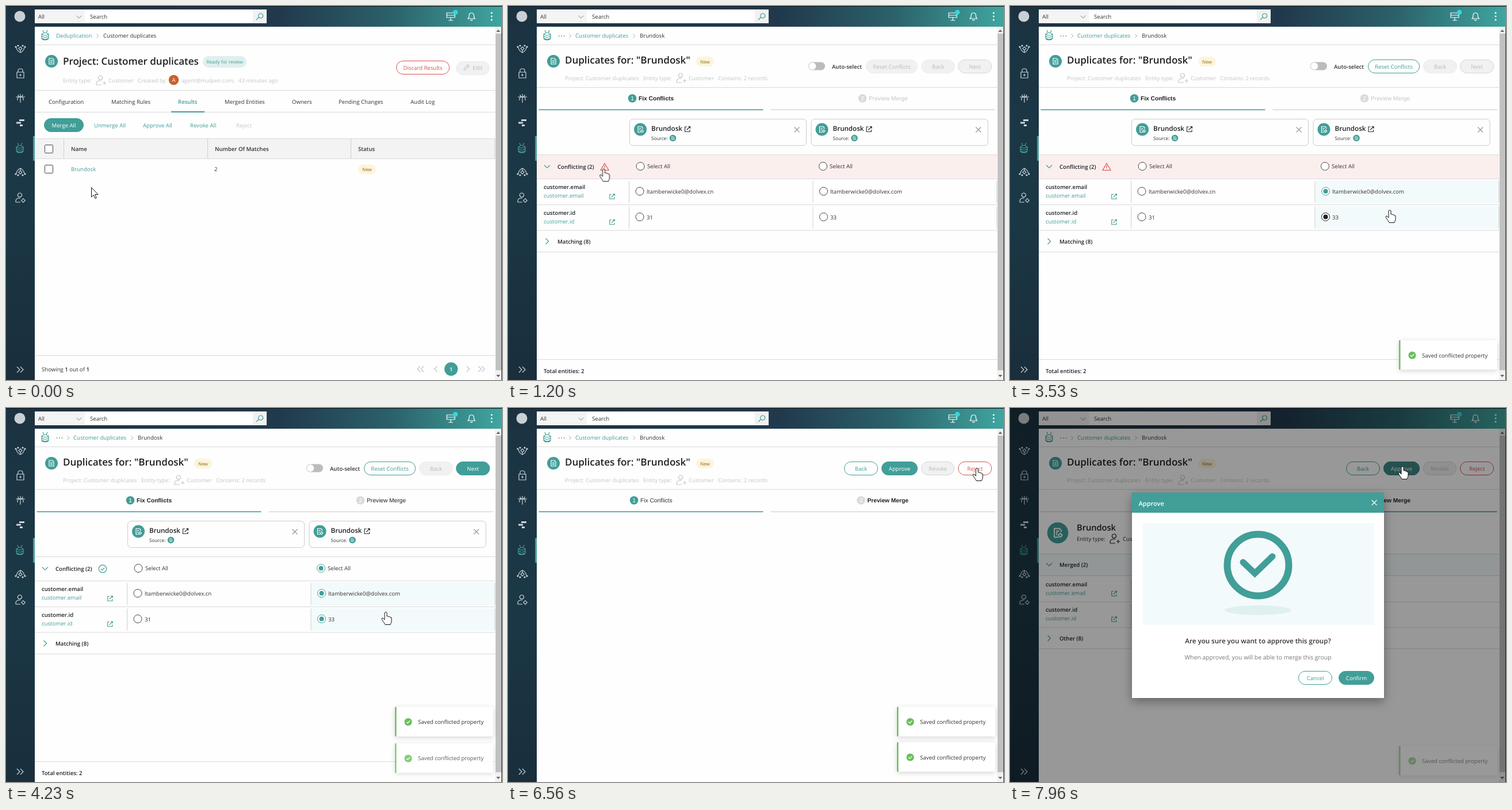
These frames come from a looping animation (862x650 px, 8 s). An HTML page:

```html
<!DOCTYPE html>
<html lang="en">
<head>
<meta charset="utf-8">
<title>Customer duplicates</title>
<style>
  html, body { margin: 0; width: 100%; height: 100%; overflow: hidden; background: #fefefe; }
  svg { display: block; width: 100%; height: 100%; color: #333; font: 9.6px "Open Sans", "Noto Sans", sans-serif; text-rendering: geometricPrecision; }
  text { fill: currentColor; white-space: pre; }
  .icon { fill: none; stroke: currentColor; stroke-width: 1.2; }
  .teal { color: #419e98; }
  .red { color: #d9534f; }
  .white { color: #fff; }
  .gray { color: #c3c5c7; }
  .dim { color: #999; }
  .black { color: #1f2023; }
  .pale { color: #ccd5da; }
  .gold { color: #8a6a2a; }
  .b { font-weight: 600; }
  .s { font-size: 8.2px; }
  .m { font-size: 11.6px; }
  .n { font-size: 14.6px; }
  .t { font-size: 17px; }
  .mid { text-anchor: middle; }
  .step { font: 10.2px "Liberation Sans", Arial, sans-serif; }
  .step.b { font-weight: 700; }
  .solid { color: #fff; }
  .solid rect { fill: #419e98; stroke: #419e98; }
  .outline rect { fill: #fefefe; stroke: currentColor; }
  .off { color: #b9babb; }
  .off rect { fill: #f1f1f1; stroke: #ededed; }
  .off.rim rect { stroke: #d6d6d6; }
  .pressed rect { fill: #3d8782; stroke: #3d8782; }

  [class^=at] { animation: 8s step-end infinite; }
  .at800 { animation-name: at800; }
  .at2900 { animation-name: at2900; }
  .at3170 { animation-name: at3170; }
  .at3500 { animation-name: at3500; }
  .at4000 { animation-name: at4000; }
  .at6460 { animation-name: at6460; }
  .at6680 { animation-name: at6680; }
  .at7660 { animation-name: at7660; }
  @keyframes at800 { from { visibility: hidden } 10%, to { visibility: visible } }
  @keyframes at2900 { from { visibility: hidden } 36.25%, to { visibility: visible } }
  @keyframes at3170 { from { visibility: hidden } 39.625%, to { visibility: visible } }
  @keyframes at3500 { from { visibility: hidden } 43.75%, to { visibility: visible } }
  @keyframes at4000 { from { visibility: hidden } 50%, to { visibility: visible } }
  @keyframes at6460 { from { visibility: hidden } 80.75%, to { visibility: visible } }
  @keyframes at6680 { from { visibility: hidden } 83.5%, to { visibility: visible } }
  @keyframes at7660 { from { visibility: hidden } 95.75%, to { visibility: visible } }

  .toast1 { animation: toast1 8s ease-out infinite; }
  .toast2 { animation: toast2 8s linear infinite; }
  @keyframes toast1 {
    0%, 39.6% { opacity: 0; transform: translateY(10px) }
    42.8%, 50% { opacity: 1; transform: none }
    51.5%, 87.5% { opacity: 1; transform: translateY(-61.5px) }
    90.6%, 100% { opacity: 0; transform: translateY(-51.5px) }
  }
  @keyframes toast2 {
    0%, 50.4% { opacity: 0; transform: translateY(10px) }
    53.5%, 97.8% { opacity: 1; transform: none }
    100% { opacity: .45; transform: translateY(8px) }
  }
  .dialog { animation: dialog 8s linear infinite; }
  @keyframes dialog { 0%, 98% { opacity: 0 } 99.4%, 100% { opacity: 1 } }

  .cursor { animation: travel 8s cubic-bezier(.65, 0, .35, 1) infinite; }
  @keyframes travel {
    0%, .75% { transform: translate(148px, 315px) }
    7.5%, 12.9% { transform: translate(148px, 281px) }
    24.1%, 37.2% { transform: translate(655px, 317px) }
    43.7%, 66.25% { transform: translate(660px, 354px) }
    77.9%, 82% { transform: translate(815px, 104px) }
    92.9%, 100% { transform: translate(682px, 101px) }
  }
  .cursor path { fill: #fff; stroke: #111; }
  .arrow { animation: arrow 8s step-end infinite; }
  .hand { animation: hand 8s step-end infinite; }
  @keyframes arrow { 0% { visibility: visible } 6% { visibility: hidden } 64% { visibility: visible } 76.6%, to { visibility: hidden } }
  @keyframes hand { 0% { visibility: hidden } 6% { visibility: visible } 64% { visibility: hidden } 76.6%, to { visibility: visible } }
</style>
</head>
<body>
<svg id="stage" viewBox="0 0 862 650"></svg>
<script>
const TEAL = '#419e98', PAGE = '#fefefe', EDGE = '#dadada', TINT = '#f3fafb';
const NAME = 'Brundosk', MAIL = 'ltamberwicke0@dolvex.';

const shapes = {
  right: 'M-2.5-5L2.5 0L-2.5 5',
  left: 'M2.5-5L-2.5 0L2.5 5',
  down: 'M-5-2.5L0 2.5L5-2.5',
  rights: 'M-5-5L0 0L-5 5M1-5L6 0L1 5',
  lefts: 'M5-5L0 0L5 5M-1-5L-6 0L-1 5',
  close: 'M-4.5-4.5L4.5 4.5M4.5-4.5L-4.5 4.5',
  open: 'M-1-4H-4.5V4.5H4V1M1-4.5H4.5V-1M4.5-4.5L-1.5 1.5',
  glass: 'M-1.5 1.5L-6 6M-1 2A4 4 0 1 1 2 3A4 4 0 0 1-1 2',
  db: 'M-4-9L-2-4.5M4-9L2-4.5M-6-2Q0-7 6-2V5Q5 8 0 8T-6 5ZM-6-2Q0 2 6-2M-6 1.5Q0 5.5 6 1.5M-6 5Q0 8.5 6 5',
  user: 'M-1-8A3.6 3.6 0 1 1-1.1-8ZM-8 8V6Q-8 1-2 1H1M-8 8H1M3 5H9M6 2V8',
  doc: 'M-4-5H1.5L4-2.5V5H-4ZM-2-1.5H2M-2 .5H2M-2 2.5H2',
  record: 'M1 5H-4V-5H2L4-3V-1M-2-2H1.5M-2 0H0M-2 2H-.5M3 1A1.8 1.8 0 1 1 2.9 1ZM3 0V1M3 4.6V5.6M.2 2.8H1.2M4.8 2.8H5.8',
  lock: 'M-6-2H6V8H-6ZM-4-2V-5Q-4-8 0-8T4-5V-2M0 1V5M-2 3H2',
  split: 'M0-7V8M-8-2H8M-4-6Q-4-2 0-2T4-6M-5 4V1Q-5-2 0-2T5 1V4',
  bars: 'M-2-3.5H7M-7 1H1M-1 5.5H4',
  admin: 'M-1-8A3.6 3.6 0 1 1-1.1-8ZM-8 8V6Q-8 1-2 1H0M-8 8H0M5 2.5A2.5 2.5 0 1 1 4.9 2.5ZM5 1V2M5 8V9M1 5H2M8 5H9',
  net: 'M0-3L3 0L0 3L-3 0ZM-7-2Q-6 4 0 7Q6 4 7-2M0 3V7',
  server: 'M-7-6H7V-2H-7ZM-7-2V2H7V-2M0 2V7M-4 7H4',
  bell: 'M-6 4Q-4 2-4-2Q-4-6 0-6T4-2Q4 2 6 4ZM-2 6Q0 8 2 6',
  pencil: 'M-5 5L-4 1L3-6L6-3L-1 4ZM1-4L4-1',
  warn: 'M0-6L7 6H-7ZM0-2V2M0 3.5V4.7',
  tick: 'M-3 0L-1 2.3L3.2-2'
};

const text = (x, y, s, cls = '') => `<text x="${x}" y="${y}" class="${cls}">${s}</text>`;
const rect = (x, y, w, h, fill, more = '') => `<rect x="${x}" y="${y}" width="${w}" height="${h}" fill="${fill}" ${more}/>`;
const disc = (x, y, r, fill, more = '') => `<circle cx="${x}" cy="${y}" r="${r}" fill="${fill}" ${more}/>`;
const icon = (id, x, y, cls = '', k = 1) => `<path class="icon ${cls}" transform="translate(${x} ${y}) scale(${k})" d="${shapes[id]}"/>`;
const group = (cls, ...parts) => `<g class="${cls}">${parts.join('')}</g>`;
const rule = (y, x = 50, w = 800, fill = EDGE) => rect(x, y, w, 1, fill);
const post = (x, y, h) => rect(x, y, 1, h, '#cfcfcf');
const pill = (x, y, w, label, cls) => group(cls,
  rect(x + .5, y + .5, w - 1, 23, '', 'rx="11.5"'), text(x + w / 2, y + 15.5, label, 'mid'));
const tag = (x, y, w, label, fill, cls) =>
  rect(x, y, w, 17, fill, 'rx="8.5"') + text(x + w / 2, y + 11.7, label, 's mid ' + cls);
const badge = (x, y, r, id, k) => disc(x, y, r, TEAL) + icon(id, x, y, 'white', k);
const radio = (x, y, color) => disc(x, y, 7, '#fff', `stroke="${color || '#444'}"`) + (color ? disc(x, y, 4, color) : '');

function step(x, n, label, color, cls) {
  return disc(x, 160.5, 7.3, color) + text(x, 164, n, 'step white mid') + text(x + 11, 164, label, 'step ' + cls);
}

function steps(second, firstCls, secondCls, x1, x2) {
  const [c1, c2] = second ? [EDGE, TEAL] : [TEAL, EDGE];
  return rect(50, 142, 800, 48, PAGE) + step(x1, 1, 'Fix Conflicts', c1, firstCls) + step(x2, 2, 'Preview Merge', c2, secondCls) +
    rect(53.5, 179.5, 390, 1.6, c1) + rect(456.5, 179.5, 390, 1.6, c2);
}

function sidebar() {
  const dots = (y, s) => [[-8, -3], [8, -3], [-4, -5], [4, -5]].map(([x, d]) => disc(25 + x, y + d * s, 1.6, '#ccd5da')).join('');
  return rect(0, 0, 50, 650, 'url(#side)') + rect(47, 226, 3, 43, TEAL) +
    group('pale', icon('net', 25, 74), dots(74, 1), icon('lock', 25, 117), icon('split', 25, 160),
      `<g stroke-width="3">${icon('bars', 25, 202).replace('class', 'style="stroke-width:3" class')}</g>`,
      `<g transform="rotate(180 25 289)">${icon('net', 25, 289)}</g>`, dots(289, -1),
      icon('admin', 25, 333), icon('rights', 24, 632)) +
    icon('db', 24, 247, 'teal');
}

function topbar() {
  return rect(0, 0, 862, 36, 'url(#top)') + rect(0, 0, 862, 1, '#0b1116') + disc(24, 18, 9.5, '#c9d0d5') +
    rect(50, 6, 87, 24, '#f4f4f4') + rect(137, 6, 292, 24, '#fff') + rect(429, 6, 24, 24, '#f1f1f1') +
    text(56, 21.5, 'All') + icon('down', 127, 19, 'dim', .85) + text(146, 22, 'Search') + icon('glass', 441, 18, 'teal') +
    group('white', icon('server', 773, 18), icon('bell', 809, 18)) + disc(781, 11, 4.3, '#38d5dc') +
    [12, 18, 24].map(y => disc(844, y, 1.5, '#fff')).join('');
}

function scrollbar() {
  return rect(850, 36, 12, 614, '#f1f1f1') + rect(851, 48, 10, 585, '#c1c1c1') +
    '<path d="M852 45h7l-3.5-4zM852 641h7l-3.5 4z" fill="#666"/>' + rect(861, 36, 1, 614, '#2d3135');
}

function listPage() {
  const tabs = { Configuration: 74, 'Matching Rules': 183, 'Merged Entities': 380, Owners: 497, 'Pending Changes': 578, 'Audit Log': 703 };
  const actions = { 'Unmerge All': 153, 'Approve All': 238, 'Revoke All': 320 };
  const box = y => rect(67.5, y + .5, 14, 14, '#fff', 'stroke="#444" rx="1"');
  const labels = (set, y, cls) => Object.entries(set).map(([s, x]) => text(x, y, s, cls)).join('');
  return text(87, 55, 'Deduplication', 'teal') + icon('right', 159, 52, 'dim', .7) + text(169, 55, 'Customer duplicates') +
    badge(79, 96, 11, 'doc') + text(99, 102, 'Project: Customer duplicates', 't b black') +
    rect(342, 87, 76, 20, '#dfefee', 'rx="10"') + text(380, 100, 'Ready for review', 's mid teal') +
    group('gray', text(99, 133, 'Entity type:'), icon('user', 165, 129), text(178, 133, 'Customer'), text(229, 133, 'Created by:'),
      text(305, 133, 'agent@mulpen.com,'), text(404, 133, '43 minutes ago')) +
    disc(291.5, 128.5, 8.7, '#c8602c') + text(291.5, 132, 'A', 'mid white') +
    pill(678, 95, 93, 'Discard Results', 'outline red') + pill(782, 96, 59, '', 'off') +
    icon('pencil', 800, 107, 'gray', .85) + text(811, 111, 'Edit', 'off') +
    rule(146) + labels(tabs, 170, '') + text(299, 170, 'Results', 'teal b') + rule(184) + rect(287, 183, 58, 2, TEAL) +
    pill(66, 195, 69, 'Merge All', 'solid') + labels(actions, 211, 'teal') + text(400, 211, 'Reject', 'gray') +
    rect(50, 230, 800, 36, '#f3f3f4') + rule(230) + rule(265) + [100, 350, 599, 849].map(x => post(x, 231, 34)).join('') +
    box(241) + labels({ Name: 113, 'Number Of Matches': 363, Status: 612 }, 252, 'b') +
    box(276) + text(113, 287, NAME, 'teal') + text(362, 287, '2') + tag(612, 275.5, 31, 'New', '#fdf4da', 'gold') +
    rule(607) + text(62, 635, 'Showing <tspan class="b">1</tspan> out of <tspan class="b">1</tspan>') +
    group('gray', icon('lefts', 721, 631), icon('left', 747, 631), icon('right', 803, 631), icon('rights', 826, 631)) +
    disc(773.5, 631, 11.7, TEAL) + text(773.5, 634.5, '1', 'mid white b');
}

function duplicateHeader() {
  return rect(85, 38, 765, 29, PAGE) + rect(50, 68, 800, 582, PAGE) +
    [88.5, 93, 97.5].map(x => disc(x, 52, .9, '#888')).join('') + icon('right', 108, 52, 'dim', .7) +
    text(117, 55, 'Customer duplicates', 'teal') + icon('right', 219, 52, 'dim', .7) + text(229, 55, NAME) +
    badge(79, 96, 11, 'doc') + text(99, 100, `Duplicates for: "${NAME}"`, 't b black') + tag(327, 88, 31, 'New', '#fdf4da', 'gold') +
    group('gray', text(99, 129, 'Project: Customer duplicates'), text(235, 129, 'Entity type:'), icon('user', 301, 125),
      text(314, 129, 'Customer'), text(365, 129, 'Contains: 2 records')) + rule(141);
}

function card(x) {
  return rect(x + .5, 196.5, 307, 46, PAGE, 'stroke="#cbcbcb" rx="6"') + badge(x + 19, 214.5, 11, 'record') +
    text(x + 38, 217, NAME, 'm b black') + icon('open', x + 101, 214) + icon('close', x + 291, 215, 'dim') +
    text(x + 38, 233, 'Source:', 's') + badge(x + 75.5, 229.5, 5.8, 'record', .55);
}

function conflictRow(done) {
  return rect(50, 259, 800, 41, done ? PAGE : '#fbefee') + icon('down', 68, 279, 'teal') + text(86, 283, 'Conflicting (2)', 'b black') +
    (done ? disc(168, 279.5, 6.7, 'none', `stroke="${TEAL}" stroke-width="1.2"`) + icon('tick', 168, 279.5, 'teal') : icon('warn', 168, 279.5, 'red')) +
    radio(230, 278.5) + text(242, 282, 'Select All') + radio(547.5, 278.5, done && TEAL) + text(559, 282, 'Select All');
}

function property(y, key) {
  return text(62, y + 17, key, 'b black') + text(62, y + 32, key, 'teal') + icon('open', 181, y + 30, 'teal', .95) +
    post(210, y + 3, 38) + rule(y + 44);
}

function choices(y, a, b) {
  return radio(229, y + 21) + text(241, y + 25, a) + post(529.5, y + 3, 38) + post(849, y + 3, 38) + radio(548.5, y + 21) + text(560, y + 25, b);
}

const chosen = (y, value, color) => rect(531, y + 2.5, 318, 39, TINT) + radio(548.5, y + 21, color) + text(560, y + 25, value);

function conflictsPage() {
  return rect(522, 97.5, 29, 14, '#bcbcbc', 'rx="7"') + disc(529, 104.5, 6.2, '#fff') + text(563, 109, 'Auto-select', 'b') +
    pill(622, 93, 90, 'Reset Conflicts', 'off') + pill(718, 93, 59, 'Back', 'off') + pill(782, 93, 59, 'Next', 'off rim') +
    steps(false, 'b black', 'gray', 216, 616) + card(211) + card(526.5) + rule(258) + conflictRow(false) + rule(300) +
    property(301, 'customer.email') + choices(301, MAIL + 'cn', MAIL + 'com') +
    property(345.5, 'customer.id') + choices(345.5, '31', '33') +
    icon('right', 68, 409, 'teal') + text(86, 412.5, 'Matching (8)', 'b black') + rule(427) +
    rule(614) + text(62, 637.5, 'Total entities: 2', 'b black');
}

function mergedContent() {
  return steps(true, '', 'b black', 219, 613.5) + badge(83, 217, 18.3, 'record', 1.5) + text(116, 212.5, NAME, 'n b black') +
    text(116, 231, 'Entity type:') + icon('user', 182, 227, 'black') + text(196, 231, 'Customer') +
    text(246, 230.5, 'Source:', 's') + badge(284, 227.5, 5.8, 'record', .55) +
    rule(253) + rect(50, 254, 800, 37, TINT) + rule(291) + icon('down', 68, 272, 'teal') + text(86, 276, 'Merged (2)', 'b black') +
    property(292.5, 'customer.email') + text(222, 318, MAIL + 'com') + property(337, 'customer.id') + text(222, 362.5, '33') +
    icon('right', 68, 400, 'teal') + text(86, 404, 'Other (8)', 'b black') + rule(418);
}

const toast = cls => group(cls, rect(676, 581, 171, 51, '#fff', 'rx="2" filter="url(#soft)"'), rect(676, 581, 2.5, 51, '#6abf5b'),
  disc(699, 607, 6.6, '#6abf5b'), icon('tick', 699, 607, 'white'), text(716, 610.5, 'Saved conflicted property'));

function dialog() {
  return rect(0, 0, 862, 650, '#000', 'opacity=".4"') + rect(212, 147, 438, 357, '#fff', 'filter="url(#deep)"') +
    rect(212, 147, 438, 35, TEAL) + text(223.5, 169.5, 'Approve', 'b white" style="font-size:11px') + icon('close', 633, 164.5, 'white') +
    rect(230, 200, 403, 177, TINT) + disc(431, 273, 53.5, 'none', `stroke="${TEAL}" stroke-width="12"`) +
    `<path d="M405 268L425.500 287.500L456 258" fill="none" stroke="${TEAL}" stroke-width="11" stroke-linecap="round"/>` +
    '<ellipse cx="431" cy="351.500" rx="57.500" ry="8.500" fill="#e0f0f1"/>' +
    text(431, 408.5, 'Are you sure you want to approve this group?', 'm b mid') +
    text(431, 436.5, 'When approved, you will be able to merge this group', 'mid" style="font-size:10.4px;color:#777') +
    pill(501, 457, 59, 'Cancel', 'outline teal') + pill(571, 457, 62, 'Confirm', 'solid');
}

const defs = `<defs>
  <linearGradient id="top"><stop stop-color="#1c3240"/><stop offset=".55" stop-color="#21394d"/><stop offset=".78" stop-color="#2b626b"/><stop offset="1" stop-color="#3fa6a0"/></linearGradient>
  <linearGradient id="side" x2="0" y2="1"><stop stop-color="#1b3342"/><stop offset=".5" stop-color="#1b3846"/><stop offset="1" stop-color="#1a2e3c"/></linearGradient>
  <filter id="soft" x="-20%" y="-40%" width="140%" height="180%"><feDropShadow dx="0" dy="2" stdDeviation="4" flood-opacity=".17"/></filter>
  <filter id="deep" x="-20%" y="-20%" width="140%" height="140%"><feDropShadow dx="0" dy="6" stdDeviation="9" flood-opacity=".35"/></filter>
</defs>`;

document.getElementById('stage').innerHTML = [
  defs, rect(0, 0, 862, 650, PAGE), sidebar(), topbar(), icon('db', 68, 51, 'teal'), rule(67),
  group('at0', listPage()),
  group('at800', duplicateHeader(), conflictsPage()),
  group('at2900', chosen(301, MAIL + 'com', '#222')),
  group('at3170', chosen(301, MAIL + 'com', TEAL), pill(622, 93, 90, 'Reset Conflicts', 'outline teal')),
  group('at3500', chosen(345.5, '33', '#222')),
  group('at4000', conflictRow(true), chosen(345.5, '33', TEAL), pill(782, 93, 59, 'Next', 'solid'), steps(false, 'b black', 'black', 216, 616)),
  group('at6460', rect(515, 80, 335, 50, PAGE), rect(50, 142, 800, 508, PAGE), steps(false, '', 'b black', 219, 613.5),
    pill(584, 93, 59, 'Back', 'outline teal'), pill(649, 93, 63, 'Approve', 'solid'),
    pill(718, 93, 58, 'Revoke', 'off rim'), pill(782, 93, 59, 'Reject', 'outline red')),
  group('at6680', mergedContent()),
  group('at7660', pill(649, 93, 63, 'Approve', 'solid pressed')),
  scrollbar(), toast('toast1'), toast('toast2'),
  group('dialog', dialog()),
  group('cursor',
    '<path class="arrow" d="M.5.5V17L4.300 13.500L7 19.500L9.300 18.500L6.700 12.500H12Z"/>',
    '<path class="hand" d="M-2 2Q0-1 2 2V8Q4 6.500 5 9Q7 7.500 8 10Q10 9 10 12V17Q9.500 19 8 22.500H-1Q-3 19-7 13Q-7 10.500-5 11L-2 14Z"/>')
].join('');
</script>
</body>
</html>
```
